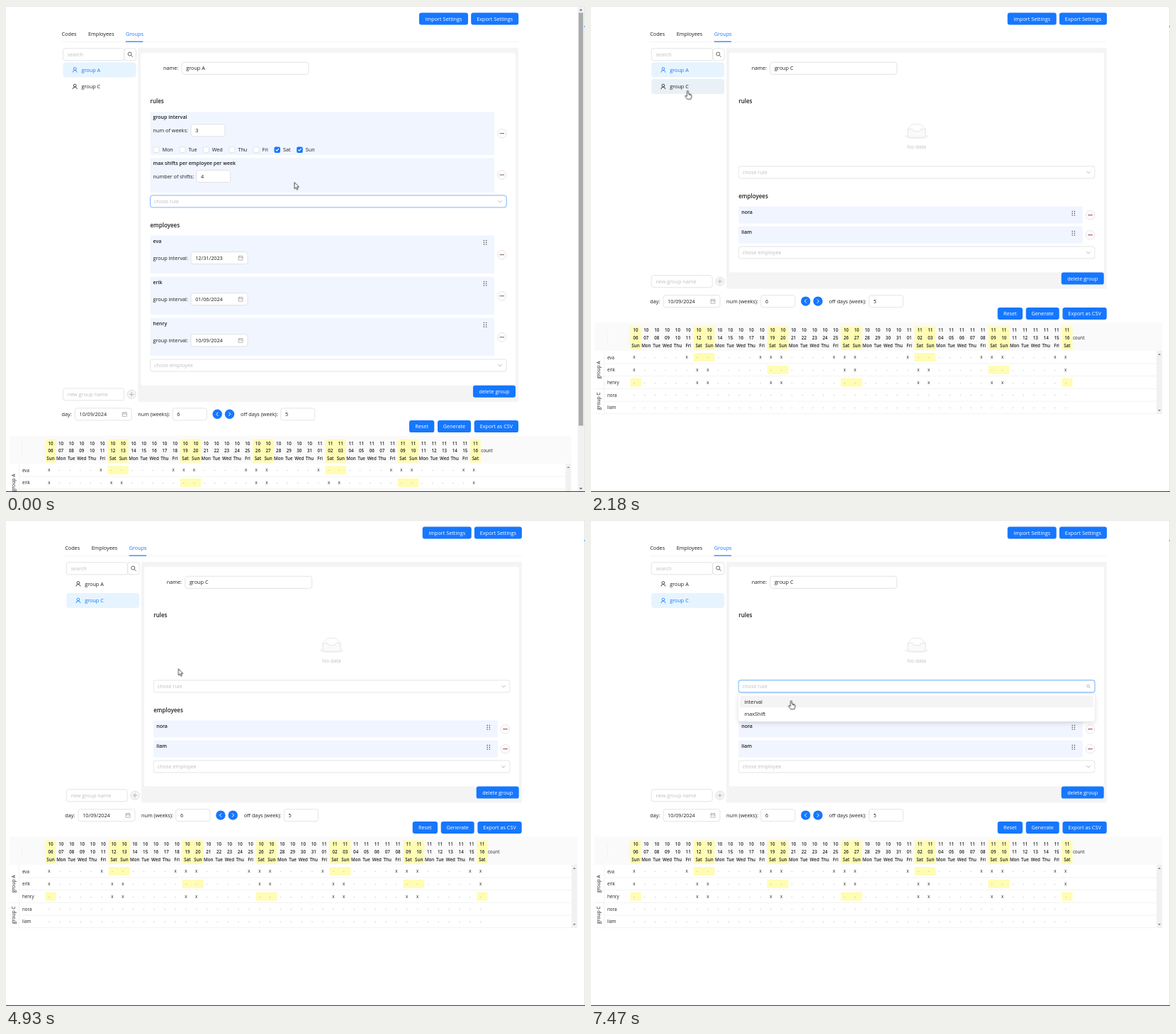
These frames come from a looping animation (817 px wide and 685 px high, 8 s). An HTML page:

```html
<!DOCTYPE html>
<html lang="en">
<head>
<meta charset="utf-8">
<title>Shift planner</title>
<style>
html, body { margin: 0; width: 100%; height: 100%; overflow: hidden; background: #fff; }
svg { display: block; width: 817px; height: 685px; }
text { font: 7.27px "Open Sans", "Noto Sans", sans-serif; fill: #1f1f1f; }
.h { font-size: 8px; font-weight: 600; }
.b { font-size: 7.05px; font-weight: 600; }
.ph { fill: #bfbfbf; }
.btn, .blue { fill: #1677ff; }
.wt { fill: #fff; }
.mid { text-anchor: middle; }
.day { font-size: 6.2px; font-weight: 600; text-anchor: middle; }
.cell { font-size: 6.2px; text-anchor: middle; }
.off { font-size: 6.2px; text-anchor: middle; fill: #a5a5a5; }
.who { font-size: 6.2px; }
.side { font-size: 6.8px; text-anchor: middle; }
.box { fill: #fff; stroke: #d9d9d9; stroke-width: .7; }
.ico { fill: none; stroke: #a6a6a6; stroke-width: .8; }
.cur text { fill: currentColor; }
.cur .ico { stroke: currentColor; }

.first { animation: first 8s infinite step-end; }
.second { animation: second 8s infinite step-end; }
.shift { animation: shift 8s infinite step-end; }
.lift { animation: lift 8s infinite step-end; }
@keyframes first { 0% { visibility: visible } 27.25%, 100% { visibility: hidden } }
@keyframes second { 0% { visibility: hidden } 27.25%, 100% { visibility: visible } }
@keyframes shift { 0% { transform: none } 27.25%, 100% { transform: translateX(4.7px) } }
@keyframes lift { 0% { transform: none } 27.25%, 100% { transform: translateY(-159.2px) } }

.blur { animation: blur 8s infinite linear; }
@keyframes blur { 0%, .85% { stroke: #4096ff } 2.63%, 100% { stroke: #d9d9d9 } }

.bgA { animation: bgA 8s infinite linear; }
.bgC { animation: bgC 8s infinite linear; }
.inkA { animation: inkA 8s infinite linear; }
.inkC { animation: inkC 8s infinite linear; }
@keyframes bgA { 0%, 27.25% { fill: #e6f4ff } 30.75%, 100% { fill: #fff } }
@keyframes bgC {
  0%, 18.5% { fill: #fff } 20.5%, 24.7% { fill: #f0f0f0 }
  26.4%, 27.25% { fill: #e9f1f6 } 30.75%, 100% { fill: #e6f4ff }
}
@keyframes inkA { 0%, 27.25% { color: #1677ff } 30.75%, 100% { color: #1f1f1f } }
@keyframes inkC { 0%, 27.25% { color: #1f1f1f } 30.75%, 100% { color: #1677ff } }

.pick { animation: pick 8s infinite linear; }
.glow { fill: none; stroke: #0591ff; stroke-opacity: .12; stroke-width: 1.6; animation: glow 8s infinite linear; }
.closed { animation: closed 8s infinite step-end; }
.open { animation: open 8s infinite step-end; }
.caret { animation: caret 8s infinite step-end; }
.menu { transform-origin: 0 245px; animation: menu 8s infinite; filter: drop-shadow(0 2px 3px rgba(0,0,0,.14)); }
@keyframes pick { 0%, 63.6% { stroke: #d9d9d9 } 66.1%, 100% { stroke: #4096ff } }
@keyframes glow { 0%, 69.9% { opacity: 0 } 71.5%, 100% { opacity: 1 } }
@keyframes closed { 0% { opacity: 1 } 70.2%, 100% { opacity: 0 } }
@keyframes open { 0% { opacity: 0 } 70.2%, 100% { opacity: 1 } }
@keyframes caret {
  0% { opacity: 0 } 70.2% { opacity: 1 } 76.87% { opacity: 0 }
  83.5% { opacity: 1 } 90.12%, 100% { opacity: 0 }
}
@keyframes menu {
  0%, 69.9% { opacity: 0; transform: scaleY(.8); animation-timing-function: cubic-bezier(.33, .67, .67, 1) }
  73.3%, 100% { opacity: 1; transform: none }
}

.mouse { animation: mouse 8s infinite linear; }
@keyframes mouse {
  0%, .75% { transform: translate(407px, 248.5px) }
  2.63%, 7% { transform: translate(195px, 165px) }
  8.5%, 10.3% { transform: translate(185px, 159px) }
  11% { transform: translate(182px, 158px); animation-timing-function: cubic-bezier(.3, .3, .5, 1) }
  20.5%, 33.3% { transform: translate(136.5px, 119.5px) }
  35.75%, 56% { transform: translate(136px, 130.5px) }
  61.62% { transform: translate(243px, 209.5px); animation-timing-function: ease-out }
  66%, 83% { transform: translate(283px, 235.7px) }
  86%, 100% { transform: translate(282.5px, 254.8px) }
}
.arrow { animation: arrow 8s infinite step-end; }
.hand { animation: hand 8s infinite step-end; }
.beam { animation: beam 8s infinite step-end; }
@keyframes arrow { 0% { opacity: 1 } 18.5% { opacity: 0 } 34.5% { opacity: 1 } 64.5%, 100% { opacity: 0 } }
@keyframes hand { 0% { opacity: 0 } 18.5% { opacity: 1 } 34.5% { opacity: 0 } 84.3%, 100% { opacity: 1 } }
@keyframes beam { 0% { opacity: 0 } 64.5% { opacity: 1 } 84.3%, 100% { opacity: 0 } }
</style>
</head>
<body>
<svg id="stage" viewBox="0 0 817 685" xmlns="http://www.w3.org/2000/svg"></svg>
<script>
// Every helper returns SVG markup; y is the vertical middle of what it draws.
const text = (x, y, s, cls = '') => `<text x="${x}" y="${y + 2.6}" class="${cls}">${s}</text>`;
const rect = (x, y, w, h, fill, r = 0) => `<rect x="${x}" y="${y}" width="${w}" height="${h}" rx="${r}" fill="${fill}"/>`;
const path = (d, cls = 'ico', more = '') => `<path d="${d}" class="${cls}" ${more}/>`;
const at = (x, y, s) => `<g transform="translate(${x} ${y})">${s}</g>`;
const group = (cls, ...parts) => `<g class="${cls}">${parts.join('')}</g>`;

const field = (x, y, w, cls = '') =>
  `<rect x="${x}" y="${y - 8.5}" width="${w}" height="17" rx="3.2" class="box ${cls}"/>`;
const input = (x, y, w, s, cls) => field(x, y, w) + text(x + 6.2, y, s, cls);
const button = (x, y, w, s) =>
  `<rect x="${x}" y="${y - 8.5}" width="${w}" height="17" rx="3.2" class="btn"/>` + text(x + w / 2, y, s, 'wt mid');
const chevron = (x, y) => at(x, y, path('M-2.6 -1.3L0 1.5L2.6 -1.3'));
const lens = (x, y, k, color) => at(x, y,
  `<g transform="scale(${k})" fill="none" stroke="${color}" stroke-width=".9"><circle cx="-.6" cy="-.6" r="2.5"/><path d="M1.3 1.3L3.6 3.6"/></g>`);
const select = (y, s, cls = '') => field(203.5, y, 502.7, cls) + text(209, y, s, 'ph');
const calendar = (x, y) => at(x, y, path('M-3 -2.4H3V3H-3ZM-3 -.4H3M-1.5 -3.4V-1.6M1.5 -3.4V-1.6', 'ico', 'stroke-width=".7"'));
const date = (x, y, s) => input(x, y, 80, s) + calendar(x + 70, y);
const minus = (y, color) =>
  `<circle cx="699.8" cy="${y}" r="6.2" class="box"/>` + rect(696.5, y - .5, 6.6, 1, color);
const panel = (y, h) => rect(203.5, y, 485.5, h, '#f0f5ff', 1);

function dots(y) {
  let s = '';
  for (let i = 0; i < 6; i++)
    s += `<circle cx="${674.5 + i % 2 * 3.2}" cy="${y + (i >> 1) * 2.8 - 2.8}" r=".75" fill="#444"/>`;
  return s;
}

const user = (x, y) => at(x, y, '<circle cy="-1.5" r="1.9" class="ico"/>' + path('M-3 3.6Q-2.8 .6 0 .6Q2.8 .6 3 3.6'));
const item = (y, s, k) =>
  `<rect x="80.5" y="${y - 10.5}" width="103" height="21" rx="4" class="bg${k}"/>` +
  group('cur ink' + k, user(97.2, y), text(106.5, y, s));

function check(x, s, on) {
  const box = on
    ? rect(x - 4.2, 198.4, 8.5, 8.5, '#1677ff', 2) + at(x, 202.6, path('M-2 0L-.5 1.6L2.2 -1.7', '', 'fill="none" stroke="#fff" stroke-width="1.1"'))
    : `<rect x="${x - 4}" y="198.6" width="8" height="8" rx="2" class="box"/>`;
  return box + text(x + 8.4, 202.6, s);
}

const person = (y, name, day) =>
  panel(y, 53.5) + text(207.5, y + 7.5, name, 'b') + text(207.5, y + 31.5, 'group interval:') +
  date(261, y + 31.5, day) + dots(y + 9.6) + minus(y + 27, '#86604a');
const shortPerson = (y, name) =>
  panel(y, 24) + text(207.5, y + 7.6, name, 'b') + dots(y + 9.8) + minus(y + 12.2, '#9c3a50');
const backdrop = h => rect(186.3, 59, 536.7, h, '#f4f4f4') + rect(190.2, 66, 529, h - 30, '#fff', 3);

// Roster: columns marked "x" (work) and highlighted pairs (free weekend) per person.
const roster = [
  ['eva', [0, 5, 12, 13, 14, 19, 20, 21, 26, 33, 34, 35, 40, 41], [6, 7, 27, 28]],
  ['erik', [0, 6, 7, 20, 21, 27, 28, 41], [13, 14, 34, 35]],
  ['henry', [6, 7, 13, 14, 27, 28, 34, 35], [0, 20, 21, 41]],
  ['nora', [], []],
  ['liam', [], []]
];
const names = ['Sun', 'Mon', 'Tue', 'Wed', 'Thu', 'Fri', 'Sat'];
const pad = n => String(n).padStart(2, '0');

function table(top, step, right) {
  const yellow = '#fffcb3', line = '#ececec';
  let s = rect(5, top, right - 5, 39.5, '#fafafa');
  for (const x of [22, 53]) s += rect(x, top + 10, .6, 20, '#efefef');
  for (let i = 0; i < 42; i++) {
    const x = 63 + i * step, d = 6 + i;
    if (i % 7 === 0 || i % 7 === 6) s += rect(x - step / 2, top + 5, step + .1, 33, yellow);
    s += text(x, top + 10.3, d > 31 ? 11 : 10, 'day') + text(x, top + 20.8, pad(d > 31 ? d - 31 : d), 'day') +
      text(x, top + 31.6, names[i % 7], 'day');
  }
  s += text(63 + 41.5 * step + .6, top + 20.5, 'count', 'who');
  roster.forEach(([name, work, free], r) => {
    const y = top + 48.6 + r * 17.7;
    s += text(23, y - .2, name, 'who');
    for (let i = 0; i < 42; i++) {
      const x = 63 + i * step, on = work.includes(i);
      if (free.includes(i)) s += rect(x - step / 2, y - 6, step + .1, 12, yellow);
      s += text(x - 2.2, y - .4, on ? 'x' : '-', on ? 'cell' : 'off');
    }
    const split = r === 2 || r === 4;
    s += rect(split ? 5 : 18.5, y + 8.6, right - 8 - (split ? 5 : 18.5), .6, line);
  });
  const end = top + 128.5;
  s += rect(18.2, top + 39.5, .6, 89, line) + rect(right - 8, top + 39.5, 8, 89, '#f1f1f1');
  s += at(right - 4, top + 44.5, path('M-2 1L0 -1.2L2 1Z', '', 'fill="#888"'));
  s += at(right - 4, end - 5, path('M-2 -1L0 1.2L2 -1Z', '', 'fill="#888"'));
  const side = (y, t) => `<text class="side" transform="translate(13.3 ${y}) rotate(-90)">${t}</text>`;
  return s + side(top + 66.3, 'group A') + side(top + 110.3, 'group C');
}

const header =
  button(583, 18, 69, 'Import Settings') + button(656.2, 18, 67, 'Export Settings') +
  rect(78.5, 50.3, 644.5, .6, '#ececec') + text(78.5, 39, 'Codes') + text(116, 39, 'Employees') +
  text(169, 39, 'Groups', 'blue') + rect(169, 49.6, 24.3, 1.2, '#1677ff') +
  input(80.5, 68.3, 86.5, 'search', 'ph') + field(167, 68.3, 16.5) + lens(175.2, 68.2, 1, '#5a5148') +
  item(90, 'group A', 'A') + item(113.6, 'group C', 'C');

const nameRow = s => text(222, 87.8, 'name:') + input(248, 87.8, 179, s);

const first = group('first',
  backdrop(499), nameRow('group A'), text(203.5, 134.5, 'rules', 'h'),
  panel(149.5, 60.5), text(207.5, 156.7, 'group interval', 'b'), text(207.5, 175.3, 'num of weeks:'),
  input(261, 175.3, 48, '3'),
  ...[[212, 'Mon'], [249, 'Tue'], [282.3, 'Wed'], [319, 'Thu'], [353, 'Fri']].map(c => check(...c)),
  check(382.7, 'Sat', 1), check(414.4, 'Sun', 1), minus(179.6, '#86604a'),
  panel(214.2, 48.5), text(207.5, 221.3, 'max shifts per employee per week', 'b'),
  text(207.5, 240, 'number of shifts:'), input(268.7, 240, 48, '4'), minus(238, '#86604a'),
  select(275.4, 'chose rule', 'blur'), chevron(697.2, 275.4),
  text(203.5, 309, 'employees', 'h'),
  person(323.6, 'eva', '12/31/2023'), person(381.7, 'erik', '01/06/2024'), person(439.8, 'henry', '10/09/2024'),
  select(506.5, 'chose employee'), chevron(697.2, 506.5));

const empty = at(454.8, 166, '<ellipse cy="17.8" rx="17" ry="3.7" fill="#f5f5f5"/>' +
  '<g stroke="#d9d9d9" stroke-width=".6"><path d="M12.3 7.3L6.8 1.2Q6.4 .6 5.8 .6H-5.8Q-6.4 .6 -6.8 1.2L-12.3 7.3V12H12.3Z" fill="#fff"/>' +
  '<path d="M-12.3 7.5H-6.3Q-5.1 7.5 -5.1 9Q-5.1 10.6 -3.9 10.6H3.9Q5.1 10.6 5.1 9Q5.1 7.5 6.3 7.5H12.3V17.2Q12.3 19.2 10.7 19.2H-10.7Q-12.3 19.2 -12.3 17.2Z" fill="#fafafa"/></g>');

const menu = group('menu',
  rect(203.4, 245, 502.8, 39, '#fff', 3.6), rect(205.5, 247.4, 498.6, 16.8, '#f4f4f4', 2),
  text(211.8, 255.9, 'interval'), text(211.8, 273, 'maxShift'));

const second = group('second',
  backdrop(339.5), nameRow('group C'), text(203.5, 134.5, 'rules', 'h'),
  empty, text(454.8, 198.5, 'No data', 'ph mid'),
  '<rect x="202.8" y="225.2" width="504.1" height="18.4" rx="3.8" class="glow"/>',
  select(234.4, 'chose rule', 'pick'), group('closed', chevron(697.2, 234.4)),
  group('open', lens(697.2, 234.3, .75, '#a0a0a0')),
  text(203.5, 268, 'employees', 'h'), shortPerson(282.5, 'nora'), shortPerson(310.5, 'liam'),
  select(347.5, 'chose employee'), chevron(697.2, 347.5),
  menu, group('caret', rect(209.3, 229.5, .8, 9.6, '#111')));

const round = (x, d) => `<circle cx="${x}" cy="575.3" r="6.7" class="btn"/>` +
  at(x, 575.3, path(d, '', 'fill="none" stroke="#fff" stroke-width="1"'));
const footer = group('lift',
  input(80.5, 547.4, 86, 'new group name', 'ph'),
  '<circle cx="177.2" cy="547.4" r="6.1" fill="#f5f5f5" stroke="#d4d4d4" stroke-width=".7"/>',
  path('M174 547.4H180.4M177.2 544.2V550.6'),
  button(659, 543.3, 60, 'delete group'),
  text(78.5, 575.4, 'day:'), date(97.3, 575.4, '10/09/2024'),
  text(186.3, 575.4, 'num (weeks):'), input(235, 575.4, 48.3, '6'),
  round(298.2, 'M1.2 -2.6L-1.4 0L1.2 2.6'), round(315.5, 'M-1.2 -2.6L1.4 0L-1.2 2.6'),
  text(331, 575.4, 'off days (week):'), input(387.7, 575.4, 48, '5'),
  button(569, 592.6, 35.3, 'Reset'), button(609, 592.6, 47, 'Generate'), button(660.7, 592.6, 62.3, 'Export as CSV'));

const pageBar = group('first', rect(806.8, 1, 9, 683, '#f1f1f1'), rect(808, 9.5, 6.4, 582, '#ababab'),
  path('M809 6.5L811.2 4L813.4 6.5ZM809 679L811.2 681.5L813.4 679Z', '', 'fill="#666"'));

const edges = rect(0, 0, 817, .8, '#e2e2e2') + rect(816, 0, 1, 685, '#e6e6e6') +
  rect(816, 28, 1, 2, '#4096ff') + rect(0, 683.9, 817, 1.1, '#2c4c5a');

const mouse = group('mouse',
  path('M0 0V9.2L2.1 7.3L3.5 10.4L5 9.7L3.6 6.7H6.5Z', 'arrow', 'fill="#fff" stroke="#111" stroke-width=".75"'),
  path('M-1 1Q-1 0 0 0Q1 0 1 1V4.2L4 5Q5.4 5.3 5.4 6.5V9L4.4 11.9H-.6L-3.6 7.8Q-3.6 6.3 -2.4 6.7L-1 7.9ZM2.4 4.8V6.4M3.9 5.2V6.6', 'hand', 'fill="#fff" stroke="#111" stroke-width=".75"'),
  path('M-1.5 -4.2H1.5M-1.5 4.2H1.5M0 -4.2V4.2', 'beam', 'fill="none" stroke="#111" stroke-width=".8"'));

document.getElementById('stage').innerHTML =
  group('first', table(605.6, 14.62, 797.5)) + group('second', table(446.5, 14.85, 806)) +
  group('shift', first, second, header, footer) + pageBar + edges + mouse;
</script>
</body>
</html>
```
